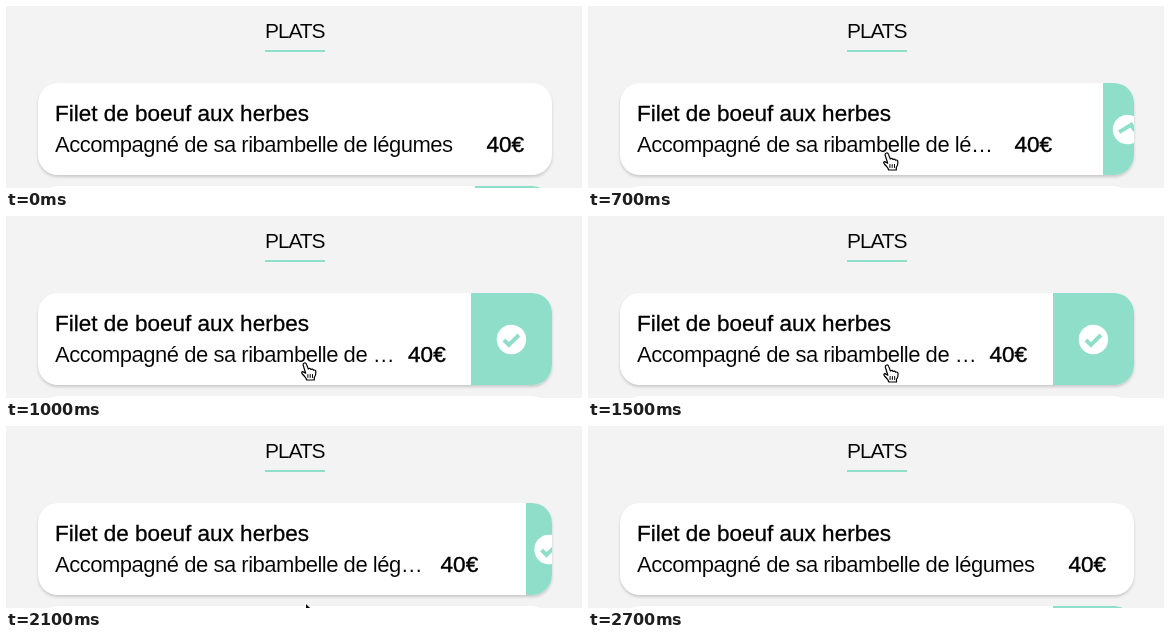
Write an HTML page that moves like this. It is 576 px wide and 182 px high and loops after 3000 ms.

```html
<!DOCTYPE html>
<html lang="fr">
<head>
<meta charset="utf-8">
<title>Plats</title>
<style>
  html, body { margin: 0; width: 100%; height: 100%; overflow: hidden; background: #f3f3f3; }
  body { position: relative; color: #000; font: 22px/24px "Liberation Sans", Arial, sans-serif; white-space: nowrap; }
  body * { position: absolute; }
  h1, h2, p { margin: 0; font-weight: 400; }
  h1 { left: 259px; top: 13px; width: 60px; height: 31px; border-bottom: 2px solid #8fdec9;
       font-size: 21px; letter-spacing: -1.1px; -webkit-text-stroke: .12px #f3f3f3; }
  .card { left: 32px; width: 514px; height: 92px; border-radius: 20px; overflow: hidden;
          background: #fff; box-shadow: 0 2px 3px rgba(0, 0, 0, .17); }
  h2 { left: 17px; top: 19px; font-size: 22.5px; -webkit-text-stroke: .3px #000; }
  #description { left: 17px; top: 49.5px; overflow: hidden; text-overflow: ellipsis;
                 letter-spacing: -.48px; -webkit-text-stroke: .12px #fff; }
  #price { top: 49.5px; font-size: 22.5px; -webkit-text-stroke: .4px #000; }
  .panel { right: 0; top: 0; height: 100%; background: #8fdec9; }
  svg { left: 0; top: 0; overflow: visible; }
</style>
</head>
<body>
<h1>PLATS</h1>
<div class="card" style="top:77px">
  <h2>Filet de boeuf aux herbes</h2>
  <p id="description">Accompagné de sa ribambelle de légumes</p>
  <p id="price">40€</p>
  <div class="panel" id="panel"></div>
  <svg width="514" height="92">
    <g id="check">
      <circle r="14.7" fill="#fff"/>
      <path d="M-7.5 .5l5 5 10-10" fill="none" stroke="#8fdec9" stroke-width="4"/>
    </g>
  </svg>
</div>
<div class="card" style="top:180px"><div class="panel" id="nextPanel"></div></div>
<svg width="576" height="182">
  <g id="hand" fill="#fff" stroke="#000" stroke-width="1.2" stroke-linejoin="round" stroke-linecap="round">
    <path d="M-2.4 2Q-2.6 .2-1 0Q.5-.2 1 1.4L2.8 6Q4.6 4.6 5.4 6.4Q7.2 5.4 8 7.2Q10.2 6.4 10.4 8.8Q10.6 12 8.8 14.4V17H1.2Q.6 14.6-3.2 11Q-4.6 9-2.8 8.6L.2 10.2Z"/>
    <path d="M2.4 11.5v3M4.7 11.5v3M7 11.5v3" stroke-width="1"/>
  </g>
  <path id="arrow" d="M0 0V15L3.5 11.7 6 17.3 8.6 16.2 6.2 10.8H11Z" stroke="#fff"/>
</svg>
<script>
const $ = id => document.getElementById(id);
const LOOP = 3000, STEP = 100, OPEN_WIDTH = 81;

function bezier(x1, y1, x2, y2) {
  const curve = (a, b, s) => 3 * a * s * (1 - s) ** 2 + 3 * b * s * s * (1 - s) + s ** 3;
  return x => {
    if (x <= 0) return 0;
    if (x >= 1) return 1;
    let low = 0, high = 1;
    for (let i = 0; i < 24; i++) {
      const mid = (low + high) / 2;
      if (curve(x1, x2, mid) < x) low = mid; else high = mid;
    }
    return curve(y1, y2, low);
  };
}
const ease = bezier(.25, .1, .25, 1);
const easeInOut = bezier(.42, 0, .58, 1);

// Panel width: slow start when opening, quick start when closing.
const panelWidth = (t, openAt, closeAt) => OPEN_WIDTH * (t < closeAt
  ? easeInOut((t - openAt) / 500)
  : 1 - ease((t - closeAt) / 395));

// Pointer tip as [time, x, y].
const pointerPath = [
  [300, 296, 190], [400, 297, 176], [500, 297.5, 162], [600, 299, 151], [700, 299.5, 147],
  [1400, 299.5, 147], [1700, 300, 153], [1900, 300, 167], [2100, 299.5, 177], [2200, 299, 190]
];

function pointerAt(t) {
  const i = pointerPath.findIndex(point => point[0] > t);
  if (i < 1) return [296, 200];
  const [from, to] = [pointerPath[i - 1], pointerPath[i]];
  const k = (t - from[0]) / (to[0] - from[0]);
  return [1, 2].map(axis => from[axis] + (to[axis] - from[axis]) * k);
}

function draw(t) {
  const width = panelWidth(t, 485, 1942);
  $("panel").style.width = width + "px";
  const turn = t < 1942 ? 360 * easeInOut((t - 460) / 460) : 0;
  const checkX = 514 - width + 14.5 + .32 * width;
  $("check").setAttribute("transform", `translate(${checkX} 46.5) rotate(${turn})`);
  $("check").style.display = width > 2 ? "" : "none";

  const shift = 79 * (ease((t - 452) / 620) - ease((t - 1942) / 620));
  $("price").style.left = 448.5 - shift + "px";
  $("description").style.width = 419 - shift + "px";

  const nextWidth = t < 1200 ? panelWidth(t, -425, 380) : panelWidth(t, 2175, LOOP);
  $("nextPanel").style.width = nextWidth + "px";

  const [x, y] = pointerAt(t);
  const betweenCards = y > 169 && y < 180;
  for (const id of ["hand", "arrow"]) {
    $(id).setAttribute("transform", `translate(${x} ${y})`);
    $(id).style.display = (id === "arrow") === betweenCards ? "" : "none";
  }
}

const start = performance.now();
function frame() {
  const t = (performance.now() - start) % LOOP;
  draw(Math.floor(t / STEP) * STEP);
  requestAnimationFrame(frame);
}
frame();
</script>
</body>
</html>
```
